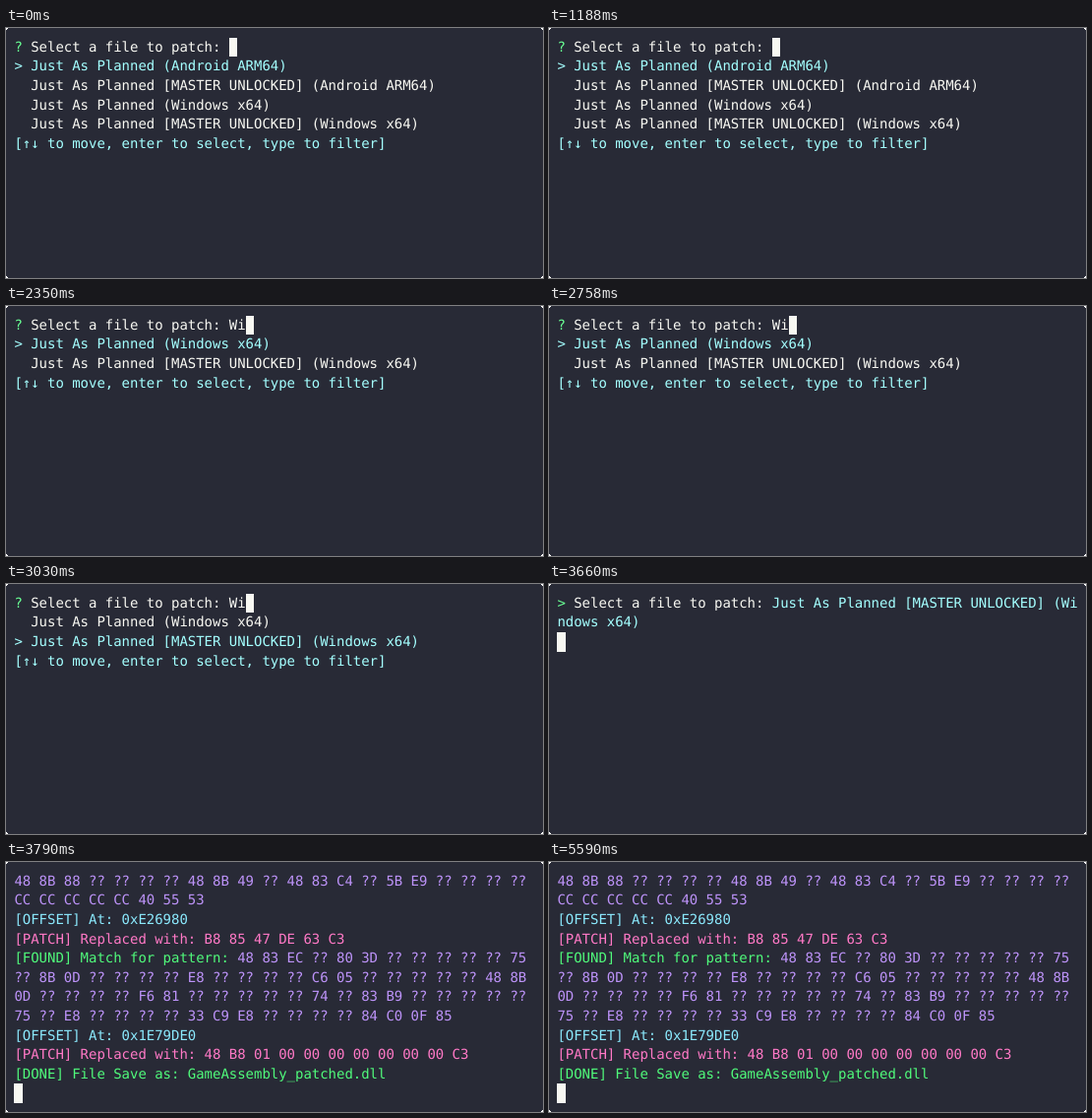
Recreate the animation shown at these times as an HTML page. Size 546 by 254 pixels, loop 6790 ms.

```html
<!DOCTYPE html>
<html lang="en">
<head>
<meta charset="utf-8">
<title>Terminal</title>
<style>
  html, body { margin: 0; width: 100%; height: 100%; overflow: hidden; background: #fff; }
  svg { display: block; }
  text {
    font: 14px "DejaVu Sans Mono", monospace;
    white-space: pre;
    text-rendering: geometricPrecision;
    font-variant-ligatures: none;
  }
  rect { shape-rendering: crispEdges; }
</style>
</head>
<body>
<svg id="term" width="546" height="254" viewBox="0 0 546 254">
  <rect width="546" height="254" rx="4" fill="#282a36"/>
</svg>
<script>
const NS = 'http://www.w3.org/2000/svg';
const CELL = 8.4, ROW = 19.6, LEFT = 8.4, TOP = 9.8, FONT = 14, LOOP = 6790;
const color = {
  fg: '#f8f8f2', green: '#50fa7b', cyan: '#8be9fd', pink: '#ff79c6', purple: '#bd93f9',
  lime: '#69ff94', aqua: '#a4ffff'
};
const term = document.getElementById('term');

// A line is a list of [color, text] runs.
const prompt = (typed = '') => [['lime', '? '], ['fg', 'Select a file to patch: ' + typed]];
const hint = [['aqua', '[↑↓ to move, enter to select, type to filter]']];
const bytes = s => [['purple', s]];
const offset = s => [['cyan', '[OFFSET] At: ' + s]];
const patch = s => [['pink', '[PATCH] Replaced with: ' + s]];
const found = s => [['green', '[FOUND] Match for pattern: '], ['purple', s]];

const plain = 'Just As Planned ';
const master = plain + '[MASTER UNLOCKED] ';
const android = '(Android ARM64)', windows = '(Windows x64)';
const winFiles = [plain + windows, master + windows];
const allFiles = [plain + android, master + android, ...winFiles];

function menu(typed, files, picked) {
  const items = files.map((f, i) => i === picked ? [['aqua', '> ' + f]] : [['fg', '  ' + f]]);
  return { lines: [prompt(typed), ...items, hint], cursor: [26 + typed.length, 0] };
}

const returnTrue = patch('48 B8 01 00 00 00 00 00 00 00 C3');
const shared = [
  bytes('48 8B 88 ?? ?? ?? ?? 48 8B 49 ?? 48 83 C4 ?? 5B E9 ?? ?? ?? ??'),
  bytes('CC CC CC CC CC 40 55 53'),
  offset('0xE26980'),
  patch('B8 85 47 DE 63 C3')
];

const screens = [
  { at: 0, ...menu('', allFiles, 0) },
  { at: 1980, ...menu('W', winFiles, 0) },
  { at: 2350, ...menu('Wi', winFiles, 0) },
  { at: 3030, ...menu('Wi', winFiles, 1) },
  { at: 3660, cursor: [0, 2], lines: [
    [['lime', '> '], ['fg', 'Select a file to patch: '], ['aqua', master + '(Wi']],
    [['aqua', 'ndows x64)']]
  ] },
  { at: 3710, cursor: [0, 11], lines: [
    bytes('33 D2 48 8B 88 ?? ?? ?? ?? 48 8B 49 ?? 48 83 C4 ?? E9 ?? ?? ??'),
    bytes('?? ' + 'CC '.repeat(13) + '48 83 EC'),
    offset('0xE26280'),
    returnTrue,
    found('40 53 48 83 EC ?? 8B D9 33 C9 E8 ??'),
    bytes('?? ?? ?? 80 3D ?? ?? ?? ?? ?? 75 ?? 8B 0D ?? ?? ?? ?? E8 ?? ??'),
    bytes('?? ?? C6 05 ?? ?? ?? ?? ?? 48 8B 05 ?? ?? ?? ?? 45 33 C0 8B D3'),
    ...shared
  ] },
  { at: 3790, cursor: [0, 11], lines: [
    ...shared,
    found('48 83 EC ?? 80 3D ?? ?? ?? ?? ?? 75'),
    bytes('?? 8B 0D ?? ?? ?? ?? E8 ?? ?? ?? ?? C6 05 ?? ?? ?? ?? ?? 48 8B'),
    bytes('0D ?? ?? ?? ?? F6 81 ?? ?? ?? ?? ?? 74 ?? 83 B9 ?? ?? ?? ?? ??'),
    bytes('75 ?? E8 ?? ?? ?? ?? 33 C9 E8 ?? ?? ?? ?? 84 C0 0F 85'),
    offset('0x1E79DE0'),
    returnTrue,
    [['green', '[DONE] File Save as: GameAssembly_patched.dll']]
  ] }
];

function add(parent, tag, attrs) {
  const el = document.createElementNS(NS, tag);
  for (const k in attrs) el.setAttribute(k, attrs[k]);
  return parent.appendChild(el);
}

const colX = c => LEFT + c * CELL;
const rowY = r => TOP + r * ROW;

function build({ lines, cursor: [cx, cy] }) {
  const g = add(term, 'g', { visibility: 'hidden' });
  const x = Math.round(colX(cx)), y = Math.round(rowY(cy));
  add(g, 'rect', {
    x, y, fill: color.fg,
    width: Math.round(colX(cx + 1)) - x,
    height: Math.round(rowY(cy + 1)) - y
  });
  lines.forEach((runs, row) => {
    let col = 0;
    for (const [name, str] of runs) {
      const xs = [...str].map((_, i) => colX(col + i).toFixed(2)).join(' ');
      add(g, 'text', { x: xs, y: rowY(row) + FONT, fill: color[name] }).textContent = str;
      col += str.length;
    }
  });
  return g;
}

const layers = screens.map(build);
let shown = -1;

function draw(now) {
  const t = now % LOOP;
  const i = screens.findLastIndex(s => s.at <= t);
  if (i !== shown) {
    layers.forEach((g, n) => g.setAttribute('visibility', n === i ? 'visible' : 'hidden'));
    shown = i;
  }
}

function tick() {
  draw(performance.now() - start);
  requestAnimationFrame(tick);
}

const start = performance.now();
tick();
</script>
</body>
</html>
```
